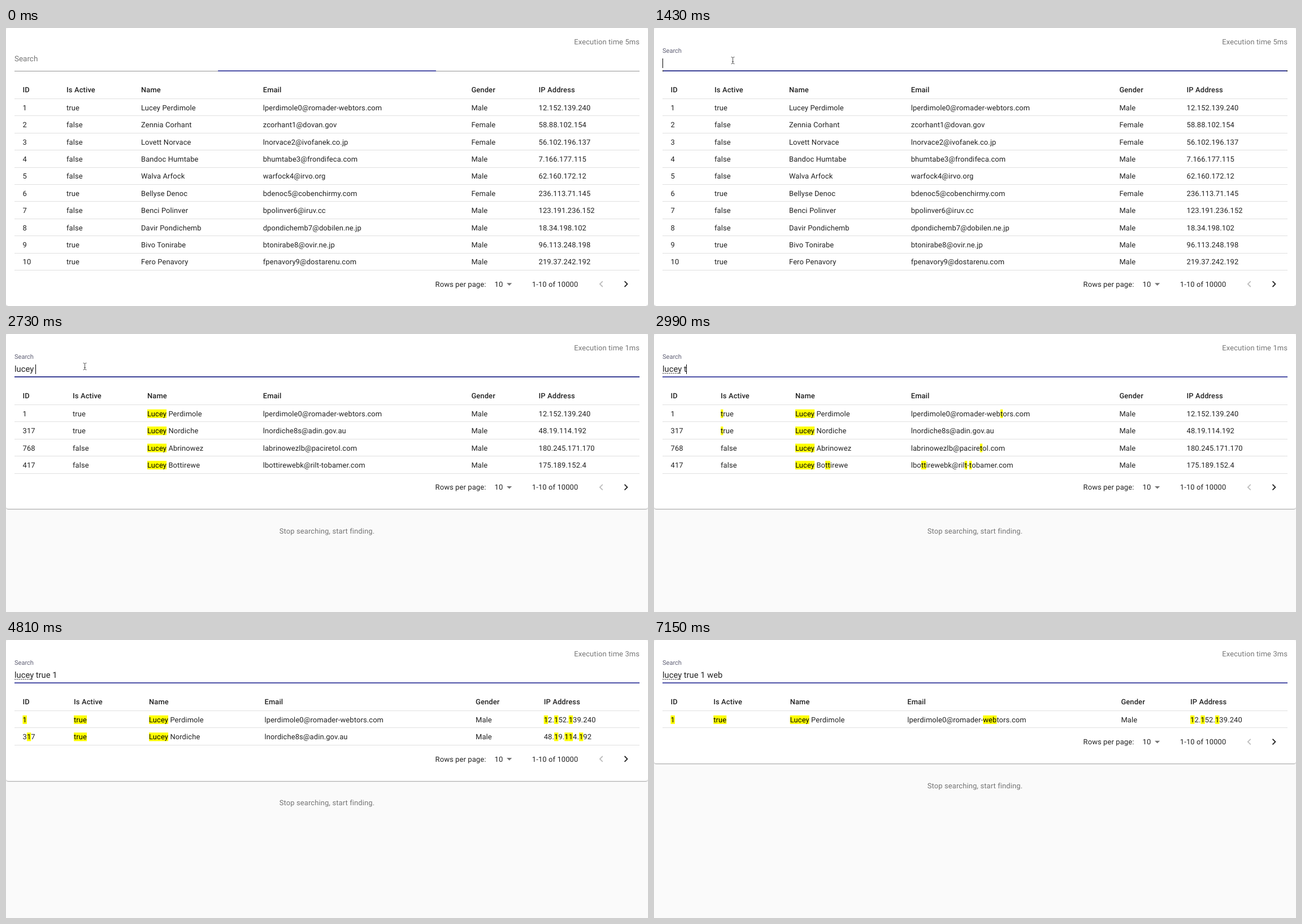
These frames come from a looping animation (1136 px wide and 493 px high, 7540 ms). An HTML page with a canvas:

```html
<!DOCTYPE html>
<html lang="en">
<head>
<meta charset="utf-8">
<title>Table search</title>
<style>
  html, body { margin: 0; width: 100%; height: 100%; overflow: hidden; background: #fafafa; }
  #card {
    position: absolute; left: 0; top: 0; width: 1136px; border-radius: 4px; background: #fff;
    box-shadow: 0 1.8px 1px -1px rgba(0,0,0,.2), 0 1px 1px rgba(0,0,0,.14), 0 1px 2.8px rgba(0,0,0,.12);
  }
  canvas { position: absolute; left: 0; top: 0; }
</style>
</head>
<body>
<div id="card"></div>
<canvas id="view" width="1136" height="493"></canvas>
<script>
const card = document.getElementById('card');
const ctx = document.getElementById('view').getContext('2d');

const LOOP = 7540, STEP = 130;
const LEFT = 15, RIGHT = 1121, ROW = 30.4, HEAD_LINE = 125.5;
const SMALL = 12.9, INPUT = 14.74, SPACING = '0.138px';
const TEXT = 'rgba(0,0,0,.87)', MUTED = 'rgba(0,0,0,.54)', PRIMARY = '#3b409f';
const FOCUS_AT = 1245, HOVER_AT = 1040, POINTER_HIDE = 2860;

const table = (cols, rows) => ({ cols, rows: rows.map(r => r.split('|')) });
const HEADERS = ['ID', 'Is Active', 'Name', 'Email', 'Gender', 'IP Address'];
const FIRST = '1|true|Lucey Perdimole|lperdimole0@romader-webtors.com|Male|12.152.139.240';
const SECOND = '317|true|Lucey Nordiche|lnordiche8s@adin.gov.au|Male|48.19.114.192';

const everyone = table([29.5, 107, 239, 454.7, 823.4, 942.5], [
  FIRST,
  '2|false|Zennia Corhant|zcorhant1@dovan.gov|Female|58.88.102.154',
  '3|false|Lovett Norvace|lnorvace2@ivofanek.co.jp|Female|56.102.196.137',
  '4|false|Bandoc Humtabe|bhumtabe3@frondifeca.com|Male|7.166.177.115',
  '5|false|Walva Arfock|warfock4@irvo.org|Male|62.160.172.12',
  '6|true|Bellyse Denoc|bdenoc5@cobenchirmy.com|Female|236.113.71.145',
  '7|false|Benci Polinver|bpolinver6@iruv.cc|Male|123.191.236.152',
  '8|false|Davir Pondichemb|dpondichemb7@dobilen.ne.jp|Male|18.34.198.102',
  '9|true|Bivo Tonirabe|btonirabe8@ovir.ne.jp|Male|96.113.248.198',
  '10|true|Fero Penavory|fpenavory9@dostarenu.com|Male|219.37.242.192'
]);
const partial = table([29.5, 118, 249, 460, 825, 944.3], [
  FIRST,
  '16|true|Ludon Corvine|lcorvinef@dovra.com|Male|142.178.78.195',
  '80|false|Henya Nadwory|hnadwory27@coraneluma.com|Female|10.83.126.29',
  '138|false|Beralus Londahn|blondahn3t@ovak.co.uk|Male|249.81.145.245',
  '183|true|Pervott Luhe|pluhe52@besavo.cn|Male|55.94.176.88',
  '206|false|Henoria Luvodem|hluvodem5p@zumodem.com|Female|246.97.62.136',
  '240|true|Torveric Di Lusin|tdi6n@irbi.com.br|Male|37.46.137.229',
  '272|true|Lumive Dorinel|ldorinel7j@vonrabe.com|Male|46.146.154.114',
  "390|false|Bertiona O'Madon|bomadonat@vartomarelutenis.com|Female|165.109.190.138",
  '415|false|Lodera Vendisto|lvendistobi@coraneluma.com|Female|117.44.217.38'
]);
const named = table([29.5, 118, 250, 454.7, 823.4, 942.5], [
  FIRST,
  SECOND,
  '768|false|Lucey Abrinowez|labrinowezlb@paciretol.com|Male|180.245.171.170',
  '417|false|Lucey Bottirewe|lbottirewebk@rilt-tobamer.com|Male|175.189.152.4'
]);
const active = table([29.5, 120, 253, 457.5, 831, 951.7], [FIRST, SECOND]);
const single = table([29.5, 105.2, 240.7, 448.2, 826.4, 949], [FIRST]);

// start time, typed query, result table, execution time in ms
const KEYS = [
  [0, '', everyone, 5],
  [2080, 'l', everyone, 5],
  [2340, 'lu', partial, 3],
  [2730, 'lucey ', named, 1],
  [2990, 'lucey t', named, 1],
  [3120, 'lucey tr', active, 2],
  [3250, 'lucey tru', active, 2],
  [3380, 'lucey true', active, 2],
  [4030, 'lucey true ', active, 2],
  [4290, 'lucey true 1', active, 3],
  [5070, 'lucey true 1 ', active, 3],
  [5200, 'lucey true 1 w', single, 3],
  [5330, 'lucey true 1 we', single, 3],
  [5460, 'lucey true 1 web', single, 3]
];

// cubic-bezier(0, 0, 0.2, 1)
function easeOut(x) {
  if (x >= 1) return 1;
  let lo = 0, hi = 1;
  for (let i = 0; i < 24; i++) {
    const s = (lo + hi) / 2;
    if (0.6 * (1 - s) * s * s + s * s * s < x) lo = s; else hi = s;
  }
  return lo * lo * (3 - 2 * lo);
}

function setFont(size, weight = 400, spacing = '0px') {
  ctx.font = `${weight} ${size}px Roboto, sans-serif`;
  ctx.letterSpacing = spacing;
}

function text(str, x, y, color = TEXT, align = 'left') {
  ctx.textAlign = align;
  ctx.fillStyle = color;
  ctx.fillText(str, x, y);
}

function rect(x, y, w, h, color) {
  ctx.fillStyle = color;
  ctx.fillRect(x, y, w, h);
}

function shape(points, x, y, color) {
  ctx.beginPath();
  for (const [px, py] of points) ctx.lineTo(x + px, y + py);
  ctx.fillStyle = color;
  ctx.fill();
}

function highlighted(str, x, y, pattern) {
  const parts = pattern ? str.split(pattern) : [str];
  parts.forEach((part, i) => {
    if (!part) return;
    const width = ctx.measureText(part).width, marked = i % 2 === 1;
    if (marked) rect(x, y - 12, width, 15.2, '#ff0');
    text(part, x, y, marked ? '#000' : TEXT);
    x += width;
  });
}

function drawTable({ cols, rows }, query) {
  const words = query.split(' ').filter(Boolean);
  const pattern = words.length ? new RegExp(`(${words.join('|')})`, 'i') : null;
  setFont(SMALL, 500, SPACING);
  HEADERS.forEach((h, c) => text(h, cols[c], 113.5));
  setFont(SMALL, 400, SPACING);
  for (let i = 0; i <= rows.length; i++) {
    rect(LEFT, Math.floor(HEAD_LINE + ROW * i), RIGHT - LEFT, 1, '#e0e0e0');
  }
  rows.forEach((row, i) => {
    row.forEach((cell, c) => highlighted(cell, cols[c], 145.7 + ROW * i, pattern));
  });
}

function chevron(x, y, dir, color) {
  const k = 0.921 * dir;
  const points = [[-3.7, 4.6], [0.9, 0], [-3.7, -4.6], [-2.3, -6], [3.7, 0], [-2.3, 6]];
  shape(points.map(([px, py]) => [px * k, py * k]), x, y, color);
}

function drawFooter(y) {
  text('Rows per page:', 759.6, y + 4.6);
  text('10', 864.5, y + 4.6);
  shape([[-4.6, -1.8], [4.6, -1.8], [0, 2.8]], 890.6, y, MUTED);
  text('1-10 of 10000', 930.8, y + 4.6);
  chevron(1053, y, -1, 'rgba(0,0,0,.26)');
  chevron(1097.3, y, 1, TEXT);
}

function drawField(t, query, lastKey) {
  const focused = t >= FOCUS_AT;
  const rest = focused ? 1 - easeOut((t - FOCUS_AT) / 200) : easeOut((t + 61) / 200);
  setFont(INPUT * (0.75 + 0.25 * rest));
  text('Search', LEFT, 43.8 + 23.2 * rest, focused ? '#5f5f74' : MUTED);

  const width = RIGHT - LEFT;
  if (t >= HOVER_AT && t < POINTER_HIDE) {
    rect(LEFT, 75.2, width, 1.8, t < HOVER_AT + STEP ? 'rgba(0,0,0,.6)' : TEXT);
  } else {
    rect(LEFT, 76, width, 1, 'rgba(0,0,0,.42)');
  }
  const active = width * (1 - rest);
  rect(LEFT + (width - active) / 2, 75.2, active, 1.8, PRIMARY);

  if (!focused) return;
  setFont(INPUT);
  text(query, LEFT, 67.3);
  if (t >= POINTER_HIDE) {
    ctx.strokeStyle = '#666';
    ctx.lineWidth = 1.3;
    ctx.setLineDash([2.6, 1.1]);
    ctx.beginPath();
    ctx.moveTo(LEFT, 69.6);
    ctx.lineTo(LEFT + 33, 69.6);
    ctx.stroke();
    ctx.setLineDash([]);
  }
  if (Math.floor((t - lastKey) / 500) % 2 === 0) {
    rect(Math.round(LEFT + ctx.measureText(query).width - 0.3), 54, 1, 17, '#000');
  }
}

function drawPointer(x, y) {
  ctx.strokeStyle = '#555';
  ctx.lineWidth = 1;
  ctx.beginPath();
  ctx.moveTo(x, y - 5);
  ctx.lineTo(x, y + 5);
  for (const d of [-1, 1]) {
    ctx.moveTo(x - 3, y + 6 * d);
    ctx.quadraticCurveTo(x, y + 6 * d, x, y + 4.5 * d);
    ctx.quadraticCurveTo(x, y + 6 * d, x + 3, y + 6 * d);
  }
  ctx.moveTo(x - 1.5, y + 2);
  ctx.lineTo(x + 1.5, y + 2);
  ctx.stroke();
}

function draw(t) {
  const [start, query, result, ms] = KEYS.filter(k => k[0] <= t).pop();
  const lastLine = HEAD_LINE + ROW * result.rows.length;
  const bottom = lastLine + 63.3;
  card.style.height = bottom + 'px';
  ctx.clearRect(0, 0, 1136, 493);

  drawTable(result, query);
  drawFooter(lastLine + 24.6);
  text(`Execution time ${ms}ms`, RIGHT, 28.7, MUTED, 'right');
  text('Stop searching, start finding.', 568, bottom + 43.7, MUTED, 'center');
  drawField(t, query, Math.max(start, FOCUS_AT));
  if (t >= HOVER_AT && t < POINTER_HIDE) drawPointer(139.5, 57.5);
}

ctx.textRendering = 'geometricPrecision';
const origin = performance.now();
function tick() {
  const t = (performance.now() - origin) % LOOP;
  draw(Math.floor(t / STEP) * STEP);
  requestAnimationFrame(tick);
}
tick();
</script>
</body>
</html>
```
